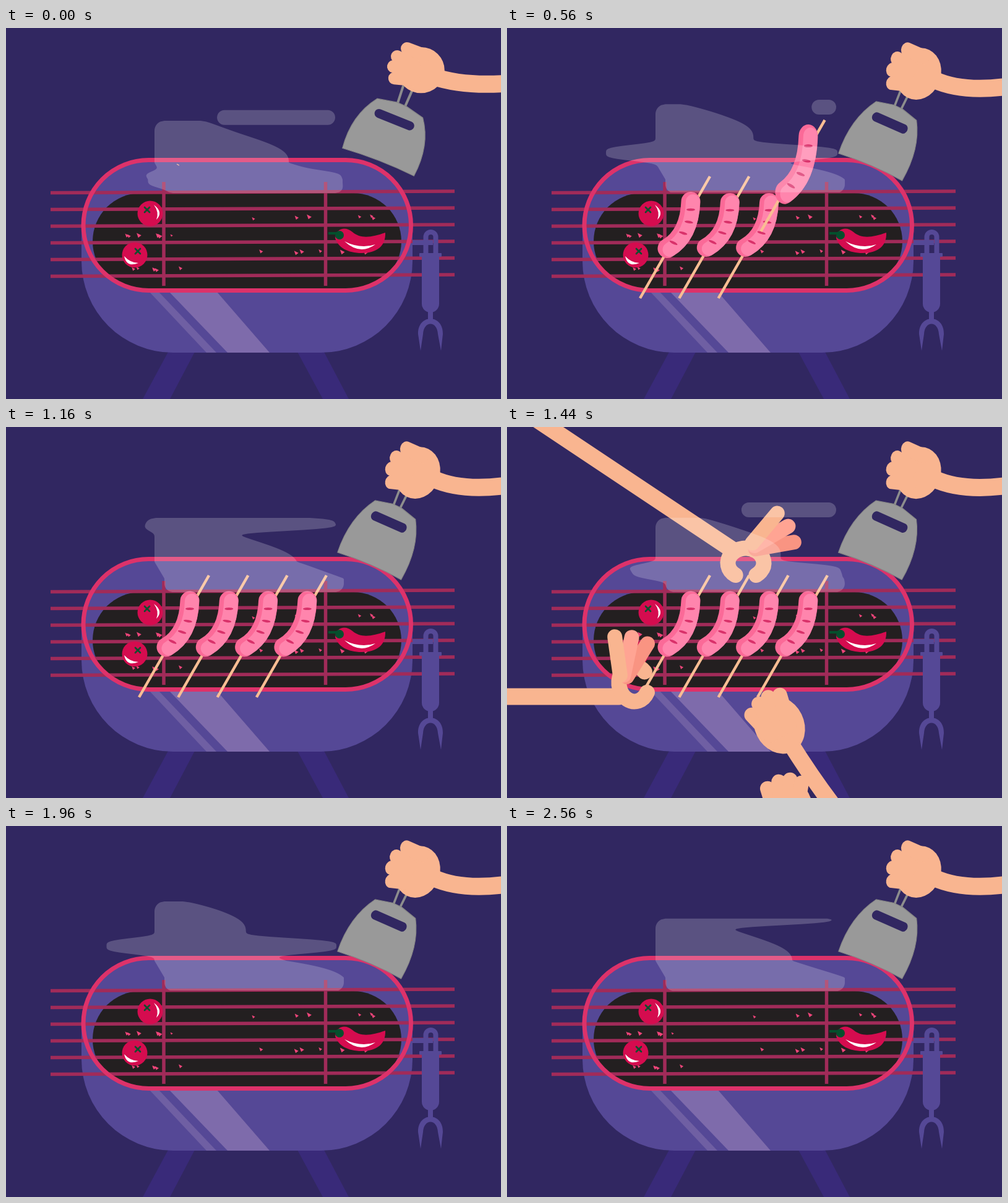
Write an HTML page with a canvas that moves like this. It is 800 px wide and 600 px high and loops after 2600 ms.

```html
<!DOCTYPE html>
<html lang="en">
<head>
<meta charset="utf-8">
<title>Barbecue</title>
<style>
html, body { margin: 0; width: 100%; height: 100%; overflow: hidden; background: #312761; }
canvas { display: block; }
</style>
</head>
<body>
<canvas id="stage" width="800" height="600"></canvas>
<script>
const LOOP = 2600, RAD = Math.PI / 180;
const GRAB = 1540, PULL = 1720, GONE = 1920;
const NIGHT = '#312761', PURPLE = '#554896', RED = '#d50c4f', SKIN = '#f9b590', GREEN = '#04502d';
const c = document.getElementById('stage').getContext('2d');

const mix = (a, b, p) => a + (b - a) * p;
const ramp = (t, from, to) => Math.min(1, Math.max(0, (t - from) / (to - from)));

function fill(d, color) {
  c.fillStyle = color;
  c.fill(new Path2D(d));
}
function stroke(d, color, width, cap = 'round') {
  c.strokeStyle = color;
  c.lineWidth = width;
  c.lineCap = cap;
  c.stroke(new Path2D(d));
}
function disc(x, y, r, color, ry = r, turn = 0) {
  c.fillStyle = color;
  c.beginPath();
  c.ellipse(x, y, r, ry, turn, 0, 7);
  c.fill();
}
function box(x, y, w, h, r, color) {
  c.fillStyle = color;
  c.beginPath();
  c.roundRect(x, y, w, h, r);
  c.fill();
}
function local(x, y, turn, draw) {
  c.save();
  c.translate(x, y);
  c.rotate(turn * RAD);
  draw();
  c.restore();
}

function embers() {
  let seed = 7;
  const random = () => (seed = seed * 16807 % 2147483647) / 2147483647;
  for (let i = 0; i < 24; i++) {
    const side = i % 2 ? mix(165, 310, random()) : mix(400, 610, random());
    const y = 304 + 28 * (i % 4) + 5 * random(), s = 2 + 2 * random();
    fill(`M${side - s} ${y - s}L${side + s} ${y}L${side - s * .3} ${y + s}Z`, '#f0457a');
  }
}

function tomato(x, y, r, cx, cy, shine) {
  disc(x, y, r, RED);
  stroke(`M${cx - 4} ${cy - 4}l8 8m0-8l-8 8`, GREEN, 2.6);
  fill(shine, '#fff');
}

function grill() {
  c.fillStyle = NIGHT;
  c.fillRect(0, 0, 800, 600);
  fill('M262 524H305L265 600H221ZM471 524H514L554 600H512Z', '#392a79');
  box(122, 212, 535, 313, [108, 108, 148, 148], PURPLE);
  fill('M232 427H247L340 525H324Z', '#6f5fa3');
  fill('M264 427H341L426 525H358Z', '#7e6bab');
  box(140, 267, 499, 156, 78, '#231f20');
  for (let i = 0; i < 6; i++) stroke(`M72 ${266.5 + 27 * i}L725 ${264 + 27 * i}`, '#a12b59', 5.5, 'butt');
  stroke('M255 249V417M516.5 249V417', '#a12b59', 5.5, 'butt');
  c.beginPath();
  c.roundRect(125, 213.5, 529.5, 211, 105.5);
  c.strokeStyle = '#dd326a';
  c.lineWidth = 7;
  c.stroke();

  // hanging fork
  box(657, 343, 33, 8, 0, PURPLE);
  stroke('M678.5 364V338a8 8 0 0 1 16 0V364', PURPLE, 8, 'butt');
  box(668, 364, 36, 6, 1, PURPLE);
  box(672, 368, 28, 92, [0, 0, 14, 14], PURPLE);
  box(682, 456, 8, 18, 0, PURPLE);
  fill('M670 522L666 495C665 462 707 462 706 495L703 522L698 495C697 473 675 473 674 495Z', PURPLE);

  embers();
  tomato(233, 300, 20.5, 228, 294, 'M239 286Q255 298 243 310Q248 298 239 286Z');
  tomato(208, 367, 20.5, 213, 361, 'M191 369Q195 388 214 380Q201 380 191 369Z');
  fill('M532 340C534 322 550 321 560 330C574 342 592 338 613 331C614 352 600 364 575 364C552 364 537 355 532 340Z', RED);
  fill('M547 345Q572 368 597 350Q573 358 547 345Z', '#fff');
  stroke('M521 332H537', GREEN, 4, 'butt');
  disc(539, 335, 7, GREEN);
}

function fan(t) {
  const p = Math.abs(Math.sin(Math.PI * t / 100));
  stroke(`M690 ${78 + 6 * p}Q${740 - 3 * p} ${95 + 11 * p} 815 ${89 + 5 * p}`, SKIN, 28);
  c.save();
  c.transform(1 - .076 * p, -.022 * p, -.1156 * p, 1 + .035 * p, 55 * p, 14.5 * p);
  stroke('M642 94L633 122M657 100L646 125', '#8d8d8d', 4);
  const blade = 'M600 114L632 120L648 127L674 145Q686 190 660 239Q605 212 544 194Q558 140 600 114Z';
  fill(blade, '#999');
  stroke(blade, '#868686', 1.2);
  stroke('M603 138L653 158', NIGHT, 14.5);
  c.restore();
  c.save();
  c.transform(1 - .04 * p, 0, -.11 * p, 1 + .14 * p, 28 * p, -3 * p);
  disc(671, 68, 38, SKIN, 37);
  stroke('M648 33L678 44M632 46L660 60M626 62L655 68M628 81L660 84', SKIN, 20);
  c.restore();
}

// Pops up above the grill with a damped bounce, then drops onto it.
function sausage(x, y, turn, age) {
  if (age <= 0) return;
  const stick = ramp(age, 0, 220), drop = -98 * (1 - ramp(age, 210, 290));
  const height = 1 - Math.exp(-age / 130) * Math.cos(2 * Math.PI * age / 400);
  local(x, y + drop, turn, () => {
    stroke(`M${50 * stick} ${-79 * stick}L${-63 * stick} ${118 * stick}`, '#f9bd93', 4.5, 'butt');
    c.scale(ramp(age, 0, 80), height);
    stroke('M-19 37Q17 16 19 -38', '#fb6a98', 31);
    stroke('M-15 39Q21 17 22.5 -38', '#ff85ad', 23);
    for (let i = 0; i < 4; i++)
      disc(19 - 3.1 * i * i, -25 + 21 * i - 1.1 * i * i, 7, '#d9316a', 2, .15 * i);
  });
}

function pinch({ x, y, turn, away, open, offset }) {
  local(x, y + offset, away, () => stroke('M24 0H800', SKIN, 27));
  local(x, y, open, () => {
    c.beginPath();
    c.ellipse(0, 0, 24, 29, 0, .62, 2 * Math.PI - .62);
    c.strokeStyle = SKIN;
    c.lineWidth = 25;
    c.lineCap = 'round';
    c.stroke();
  });
  const bx = x - 20 * Math.cos(open * RAD), by = y - 20 * Math.sin(open * RAD);
  ['#f99482', '#ffa493', SKIN].forEach((color, i) =>
    local(bx, by, turn + 20 * (2 - i), () => stroke('M16 0H79', color, 24)));
}

function fist({ x, y, turn, reach }) {
  local(x, y, turn, () => {
    stroke('M3 25Q11 100 24 160Q40 230 80 400', SKIN, 27);
    disc(0, -1 - reach / 2, 40, SKIN, 40 + reach / 2);
    for (let i = 0; i < 4; i++) {
      const kx = -33 + 18.3 * i, ky = -27 - 15 * i + 4 * i * i;
      stroke(`M${kx} ${ky - reach}L${kx * .6} 0`, SKIN, 24);
    }
  });
}

// Each hand takes one sausage: poses when gripping and after pulling it off.
// "away" is the direction in which the arm leaves the picture.
const guests = [
  { draw: pinch, enter: 1220, meat: { x: 276, y: 399, turn: 67 },
    grip: { x: 205, y: 415, turn: -98, away: 180, open: -7, offset: 21 },
    pull: { x: 155, y: 373, turn: -42, away: 164, open: 54, offset: -10 } },
  { draw: pinch, enter: 1220, meat: { x: 350, y: 258, turn: -61.5 },
    grip: { x: 386, y: 220, turn: -50, away: 213.7, open: 90, offset: -7 },
    pull: { x: 306, y: 170, turn: -71, away: 185.7, open: 75, offset: -9 } },
  { draw: fist, enter: 1340, meat: { x: 430, y: 357, turn: 11.5 },
    grip: { x: 352, y: 458, turn: 0, away: 59, reach: 16 },
    pull: { x: 352, y: 440, turn: 0, away: 81, reach: 0 } },
  { draw: fist, enter: 1220, meat: { x: 516, y: 404, turn: -1 },
    grip: { x: 444, y: 490, turn: -26, away: 55, reach: 16 },
    pull: { x: 467, y: 503, turn: -42, away: 41, reach: 0 } }
];

function blend(a, b, p) {
  const pose = {};
  for (const key in a) pose[key] = mix(a[key], b[key], p);
  return pose;
}

function party(t) {
  const p = ramp(t, GRAB, PULL), exit = 560 * ramp(t, PULL, GONE);
  const hands = guests.map(({ grip, pull }) => blend(grip, pull, p));
  const shift = (pose, angle, distance) => {
    pose.x += distance * Math.cos(angle * RAD);
    pose.y += distance * Math.sin(angle * RAD);
    return pose;
  };
  guests.forEach(({ meat }, i) => {
    const { x, y, turn } = shift(blend({ x: 278 + 63.3 * i, y: 319, turn: 0 }, meat, p), hands[i].away, exit);
    sausage(x, y, turn, t - 120 * i);
  });
  guests.forEach(({ draw, enter }, i) => {
    const distance = exit + 400 * (1 - ramp(t, enter, enter + 200));
    if (t > enter) draw(shift(hands[i], hands[i].away, distance));
  });
}

// A leaning column of smoke; wide bands rise through it and break off as puffs.
function smoke(t) {
  const period = LOOP / 2, age = t % period, bottom = 267;
  const height = a => Math.max(128, 245 - .077 * a);
  const top = 136 + 14 * Math.cos(2 * Math.PI * age / period);
  const bandReach = 80 * Math.max(0, Math.sin(Math.PI * (age + 150) / 1400));
  const left = [], right = [];
  for (let y = top; y <= bottom; y += 1.5) {
    const band = Math.exp(-(((y - height(age)) / 14) ** 4));
    const base = ramp(y, 218, 245);
    const lean = 330 + 1.5 * (y - 135) + 22 * Math.cos(2 * Math.PI * ((y - 197) / 91 + age / period));
    const round = (d, r) => d < r ? r - Math.sqrt(r * r - (r - d) ** 2) : 0;
    const inset = round(y - top, 16) + round(bottom - y, 14);
    left.push([240 + 16 * base - bandReach * band + inset, y]);
    right.push([mix(mix(lean, 546, base), 534 + 10 * base, band) - inset, y]);
  }
  c.beginPath();
  for (const [x, y] of [...left.reverse(), ...right]) c.lineTo(x, y);
  c.closePath();
  const old = age + period, puff = 330 + .27 * (old - 1260);
  if (puff < 515) c.roundRect(puff, height(old) - 12, 532 - puff, 24, 12);
  c.fillStyle = 'rgba(255,255,255,.2)';
  c.fill();
}

function frame() {
  const t = performance.now() % LOOP;
  grill();
  fan(t);
  if (t < GONE) party(t);
  smoke(t);
  requestAnimationFrame(frame);
}
frame();
</script>
</body>
</html>
```
